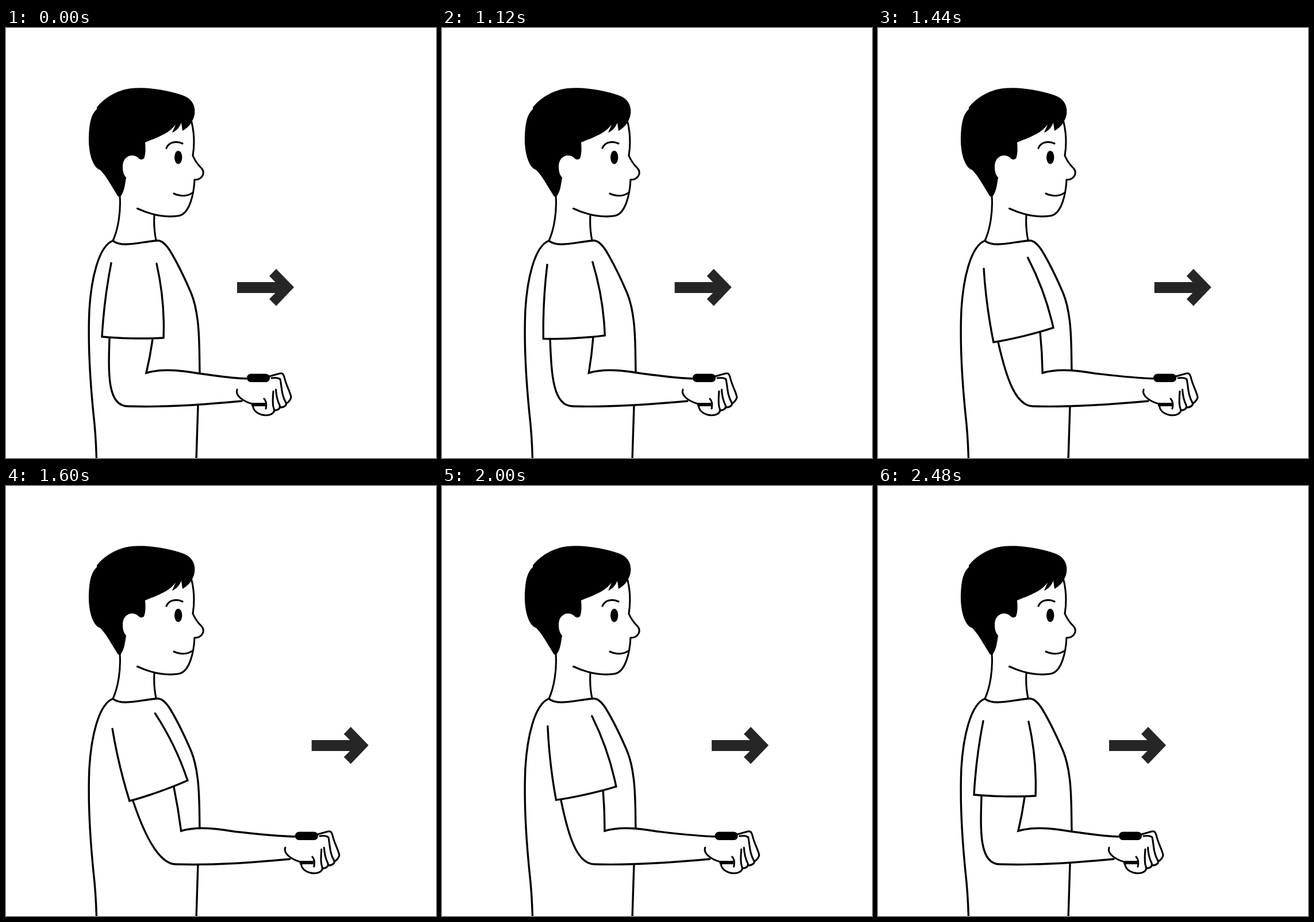
Animation, 748 px wide and 748 px high, one loop 4 s. Source, as an HTML page:

```html
<!DOCTYPE html>
<html lang="en">
<head>
<meta charset="utf-8">
<title>Forward arm reach</title>
<style>
  html, body { margin: 0; width: 100%; height: 100%; overflow: hidden; background: #fff; }
  svg { display: block; width: 100%; height: 100%; }
  .line { fill: none; stroke: #000; stroke-width: 3.4; stroke-linecap: round; stroke-linejoin: round; }
  .thin { stroke-width: 3.1; }
  .mitre { stroke-linejoin: miter; }
  .white { fill: #fff; }
</style>
</head>
<body>
<svg viewBox="0 0 748 748">
  <g class="line">
    <path d="M186 370C160 380 148 440 145 490C142 555 147 620 152 670C156 705 157 730 157.5 752"/>
    <path d="M186 370C200 383 235 372 261 370C270 368 278 376 285 387C299 410 313 440 322 461C338 500 336 555 337 600L334 657L331 752"/>
    <g class="thin">
      <path d="M198 292C200 320 195 350 186 370M258 326C257 343 258 355 261 369"/>
      <path d="M323 164C328 185 328 203 325 222C329 232 334 238 341 245C346 252 342 264 328 264C327 286 320 326 298 327C275 330 250 324 228.500 314"/>
      <path d="M279 209C283 198 297 196 307 201M292 288C303 293 315 293 324 287"/>
    </g>
  </g>
  <path d="M158 138C172 120 195 108 217 105C250 102 290 110 312 119C325 125 330 138 328 150C326 162 319 172 307 179L305 165C302 172 297 179 289 182L295 168C283 184 264 190 242 199C243 210 243 220 240 227C236 230 232 229 229 225C218 217 203 224 203 241C203 250 205 256 209 260C207 272 206 284 200 292C197 295 194 293 193 290C182 272 173 256 164 247C150 243 143 215 144 188C145 165 148 150 158 141Z"/>
  <ellipse cx="299.700" cy="225" rx="6.700" ry="11.500"/>

  <path id="skin" class="white"/>
  <path id="arm" class="line mitre"/>
  <path id="sleeve" class="line mitre" d="M183 409C174 455 169 500 167 537C195 540 240 541 274 539C276 490 271 450 262 410"/>

  <g id="hand">
    <path class="white" d="M419 611L476 602L484 606L496 642L489 653L467 666L454 673L432 666L429 656L404 644Z"/>
    <rect x="419" y="601.500" width="40" height="14.500" rx="7"/>
    <path d="M427 652H451V658H427Z"/>
    <g class="line thin">
      <path d="M402 629C398 640 414 650 429 654"/>
      <path d="M429.500 657C430 668 444 676 458 673C465 671 468 667 466 662C463 655 464 643 465 632"/>
      <path d="M449 645C454 650 453 657 452 662"/>
      <path d="M467 665C474 665 478 661 476 656C471 646 470 638 469.500 629"/>
      <path d="M477 660C484 660 489 656 487 652C479 638 480 626 477 611C473 608 468 608 462 609"/>
      <path d="M458 606L476 601C482 600 482 602 484 607C487 621 494 632 496 642C496 646 491 651 488 653"/>
    </g>
  </g>

  <path id="arrow" fill="#262626" d="M402 442H468.500L458 431.500L470 419L501 451L470 483.500L458 471.500L468.500 461H402Z"/>
</svg>
<script>
const LOOP = 4000, STEP = 80, PEAK = 1705;
const SHOULDER = { x: 221, y: 410 }, SWING = 22.5, FULL_REACH = 92;

const el = id => document.getElementById(id);
const set = (id, name, value) => el(id).setAttribute(name, value);

// Rises from 0 to 1 at the peak and falls back at the same rate.
const pulse = (time, span) => Math.max(0, 1 - Math.abs(time - PEAK) / span);
const smoother = s => s ** 3 * (10 - 15 * s + 6 * s * s);

// Turns a point of the resting upper arm about the shoulder.
function turn(x, y, degrees) {
  const r = degrees * Math.PI / 180, dx = x - SHOULDER.x, dy = y - SHOULDER.y;
  return [SHOULDER.x + dx * Math.cos(r) - dy * Math.sin(r),
          SHOULDER.y + dx * Math.sin(r) + dy * Math.cos(r)];
}

// The upper arm follows the sleeve, the wrist follows the hand, the elbow lags between.
function armLines(reach, angle) {
  const a = reach / FULL_REACH;
  const bend = reach * (.65 + .08 * a);
  const heel = 212 + bend * 1.38, inner = 244 + bend, wrist = 422 + reach;
  const back = turn(180 - 8 * a, 540, angle), backPull = turn(178 - 8 * a, 600, angle);
  const front = turn(255 - 8 * a, 541, angle);
  const under = `${back}C${backPull} ${heel - 36 + 7 * a} 658 ${heel} 658` +
    `C${heel + 68} 660 ${wrist - 77} 655 ${wrist - 12} 649`;
  const upper = `${wrist} 610C${wrist - 37} 609 ${inner + 118} 604 ${inner + 92} 601` +
    `C${inner + 66} 597 ${inner + 31} 591 ${inner} 600` +
    `Q${(inner + front[0]) / 2 + 1.5} ${(600 + front[1]) / 2} ${front}`;
  return { under, upper };
}

function draw(elapsed) {
  const time = Math.floor(elapsed % LOOP / STEP) * STEP;
  const reach = 100 * pulse(time, 750) ** 1.17;
  const slide = 137 * smoother(pulse(time, 804) ** 1.54);
  const angle = -SWING * reach / FULL_REACH;
  const { under, upper } = armLines(reach, angle);
  set('skin', 'd', `M${under}L${upper}Z`);
  set('arm', 'd', `M${under}M${upper}`);
  set('sleeve', 'transform', `rotate(${angle} ${SHOULDER.x} ${SHOULDER.y})`);
  set('hand', 'transform', `translate(${reach})`);
  set('arrow', 'transform', `translate(${slide})`);
}

const begin = performance.now();
function tick() {
  draw(performance.now() - begin);
  requestAnimationFrame(tick);
}
tick();
</script>
</body>
</html>
```
